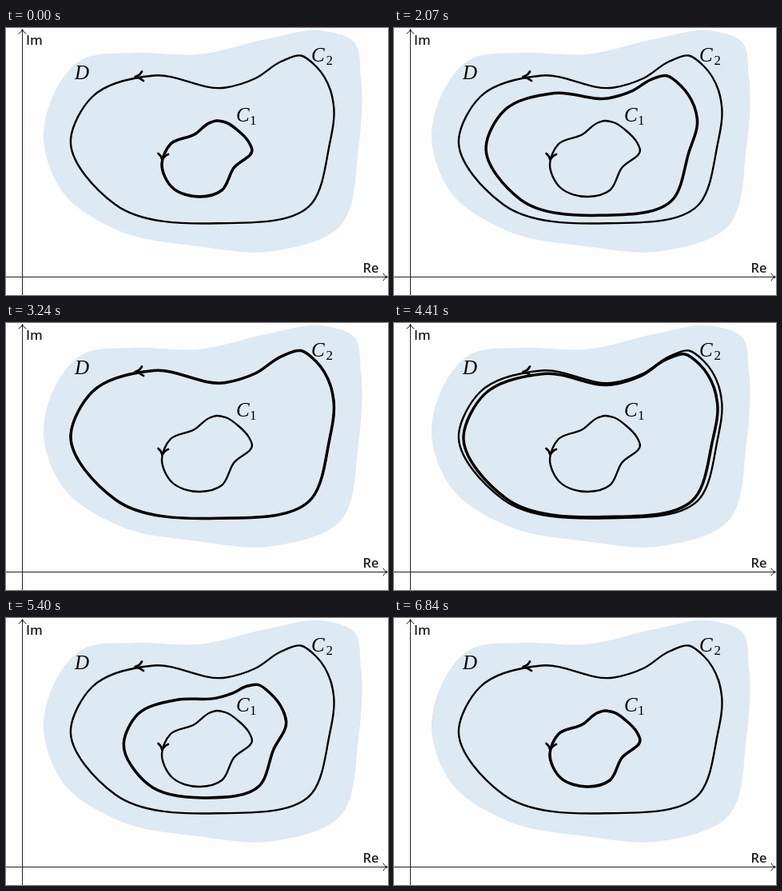
These frames come from a looping animation (478 px wide and 334 px high, 7.02 s). An HTML page:

```html
<!DOCTYPE html>
<html lang="en">
<head>
<meta charset="utf-8">
<title>Contour deformation</title>
<style>
  html, body { margin: 0; width: 100%; height: 100%; overflow: hidden; background: #fefefe; }
  svg { display: block; }
  path { fill: none; stroke: #000; stroke-linejoin: round; stroke-linecap: round; }
  #domain { fill: #dde9f3; stroke: none; }
  #inner, #outer { stroke-width: 2.4; }
  .arrow { stroke-width: 2.7; }
  #moving { stroke-width: 3.5; }
  .axis { stroke: #222; stroke-width: 1; }
  .name { font: 600 16.5px "Open Sans", "Noto Sans", sans-serif; fill: #222; }
  .math { font: italic 25px "Liberation Serif", "Times New Roman", serif; }
  .sub { font: 17px "Liberation Serif", "Times New Roman", serif; }
</style>
</head>
<body>
<svg width="478" height="334" viewBox="0 0 478 334">
  <path id="domain"/>
  <path class="axis" d="M0 311.5H477M472 307Q473.500 310.500 477.500 311.500Q473.500 312.500 472 316"/>
  <path class="axis" d="M20.500 334V2M16 7Q19.500 5.500 20.500 1.500Q21.500 5.500 25 7"/>
  <text class="name" x="25" y="21">Im</text>
  <text class="name" x="446.500" y="306">Re</text>
  <text class="math" x="86" y="64">D</text>
  <text class="math" x="288" y="116.500">C</text>
  <text class="sub" x="305" y="121">1</text>
  <text class="math" x="382" y="41.500">C</text>
  <text class="sub" x="400.500" y="46">2</text>
  <path id="inner"/>
  <path id="outer"/>
  <path class="arrow" d="M170 54.500Q167 60 161.500 61Q167 62 172 66"/>
  <path class="arrow" d="M190.500 157Q194.500 160 195.500 165Q198 160 203 158"/>
  <path id="moving"/>
</svg>
<script>
  const LOOP = 7020, TICK = 90, LAG = 0.2;

  // Key points shared by both contours: inner x, y, outer x, y
  const keys = [
    [195, 170, 81, 139], [206, 145, 108, 86], [236, 133, 185, 59.5],
    [255, 118.5, 275, 74.5], [264, 116, 312, 63], [270, 116.8, 345, 41.5],
    [276, 118.5, 369, 34.5], [290, 128, 388, 48], [304, 143, 406, 78],
    [307.8, 152, 410, 97], [285, 175, 404, 150], [270, 203, 383, 219],
    [243, 211, 265, 244.3], [208, 199.5, 137, 221]
  ];

  const region = [
    [47, 138], [98, 38], [160, 31], [240, 33], [330, 13], [398, 3.5], [436, 18],
    [444, 60], [441, 150], [418, 248], [335, 279], [240, 273], [140, 253], [70, 204]
  ];

  // Smooth closed curve through points, tangents weighted by chord length
  function closed(pts) {
    const n = pts.length;
    const chord = pts.map((p, i) => {
      const q = pts[(i + 1) % n];
      const dx = q[0] - p[0], dy = q[1] - p[1];
      return { dx, dy, len: Math.hypot(dx, dy) };
    });
    const slope = chord.map((b, i) => {
      const a = chord[(i + n - 1) % n];
      const mix = k => (a[k] / a.len * b.len + b[k] / b.len * a.len) / (a.len + b.len);
      return [mix("dx"), mix("dy")];
    });
    const handle = (i, k) => pts[i].map((c, axis) => (c + slope[i][axis] * k).toFixed(2));
    let d = "M" + pts[0];
    for (let i = 0; i < n; i++) {
      const j = (i + 1) % n, k = chord[i].len / 3;
      d += "C" + [handle(i, k), handle(j, -k), pts[j]].join(" ");
    }
    return d + "Z";
  }

  const contour = s => closed(keys.map(([x, y, u, v]) => [x + (u - x) * s, y + (v - y) * s]));
  const draw = (id, d) => document.getElementById(id).setAttribute("d", d);

  // Swing from the inner contour (0) to the outer (1) and back
  function progress(step) {
    const angle = 2 * Math.PI * (step - LAG) * TICK / LOOP;
    return (1 - Math.sin(Math.PI / 2 * Math.cos(angle))) / 2;
  }

  draw("domain", closed(region));
  draw("inner", contour(0));
  draw("outer", contour(1));

  const start = performance.now();
  function frame(now) {
    const step = Math.floor(Math.max(0, now - start) % LOOP / TICK);
    draw("moving", contour(progress(step)));
    requestAnimationFrame(frame);
  }
  frame(start);
</script>
</body>
</html>
```
